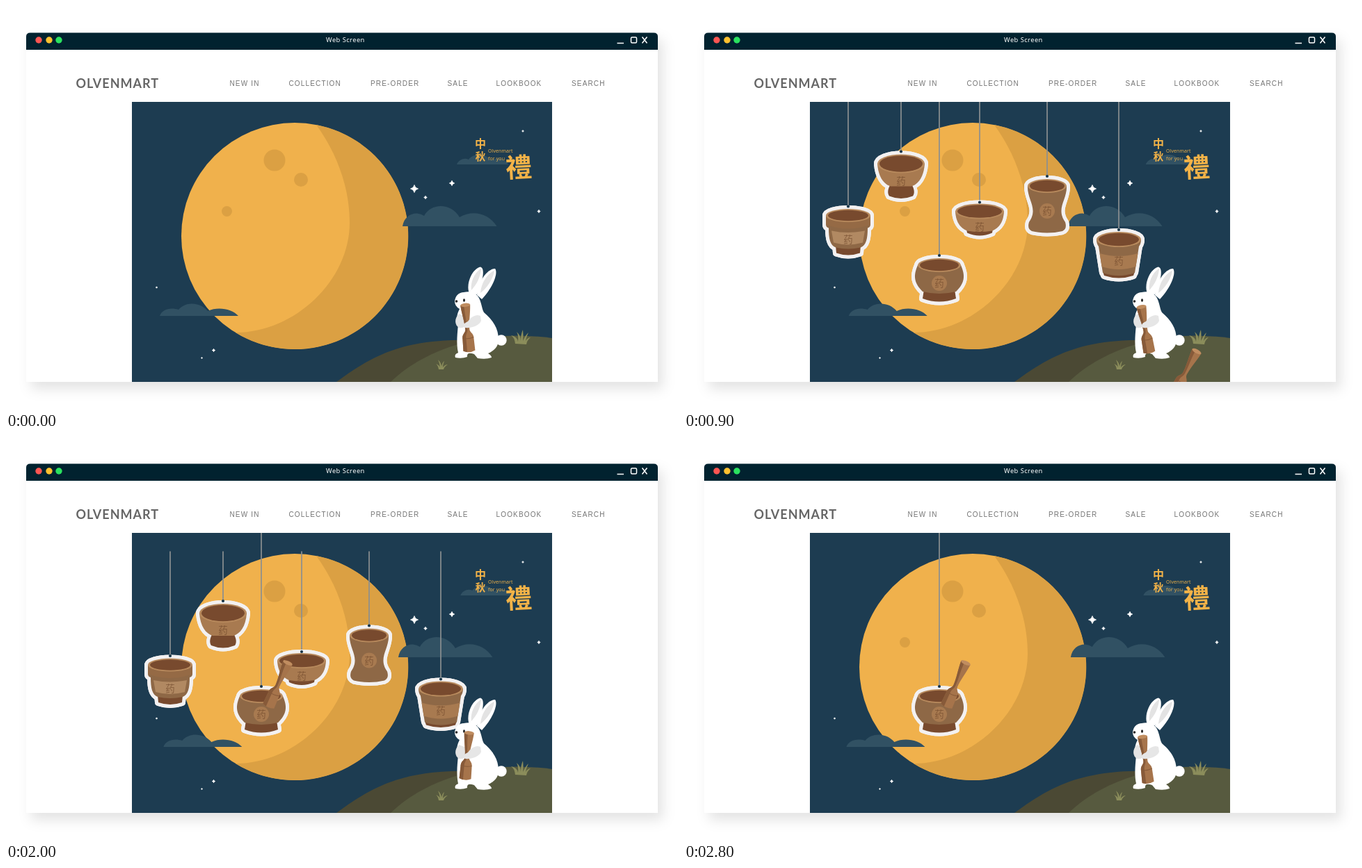
Write an HTML page that moves like this. It is 966 px wide and 580 px high and loops after 2900 ms.

```html
<!DOCTYPE html>
<html lang="en">
<head>
<meta charset="utf-8">
<title>Moon festival shop</title>
<style>
html, body { margin: 0; height: 100%; overflow: hidden; background: #fff; }
svg { display: block; }
.window { filter: drop-shadow(7px 10px 9px rgba(0, 0, 0, .11)); }
.title { font: 9.3px "Noto Sans", sans-serif; letter-spacing: .45px; fill: #fff; }
.logo { font: bold 18px Lato, sans-serif; letter-spacing: 1px; fill: #666; }
.nav { font: 10px "Liberation Sans", Arial, sans-serif; letter-spacing: 1.15px; fill: #747474; }
.gift { font: bold 16px "Noto Sans CJK TC", "Noto Sans CJK SC", sans-serif; fill: #f3b348; text-anchor: middle; }
.small { font: 7px "Open Sans", sans-serif; letter-spacing: .1px; fill: #f3b348; }
.mark { font: 300 13.5px "Noto Sans CJK SC", "Noto Sans CJK TC", sans-serif; fill: #70482b; opacity: .65; text-anchor: middle; }
.sticker * { fill: #f3f1f1; stroke: #f3f1f1; stroke-width: 10; stroke-linejoin: round; }
.string { stroke: #8b8f91; stroke-width: 1.7; }
.cloud { fill: #315163; }
.grass { fill: #8b8d5b; }
</style>
</head>
<body>
<svg width="966" height="580" viewBox="0 0 966 580">
  <defs>
    <clipPath id="art"><path d="M181 138H785V541H181Z"/></clipPath>
    <g id="pestle">
      <path fill="#a6744b" d="M-7 0C-6 14 -3 24 -3 35C-3 40 -8 41 -8 47L-8.5 66Q0 70 8.5 66L8 47C8 41 3 40 3 35C3 24 6 14 7 0Z"/>
      <path fill="#875a39" d="M-7 0C-6 14 -3 24 -3 35C-3 40 -8 41 -8 47L-8.5 66L-3 68L-3 47C-3 41 0 40 0 35C0 24 -2 14 -2 2Z"/>
      <path fill="none" stroke="#875a39" d="M-8 47Q0 50 8 47"/>
      <ellipse rx="7" ry="2.7" fill="#c08d60"/>
    </g>
  </defs>

  <g class="window">
    <path fill="#fff" d="M29 44Q29 38 35 38H931Q937 38 937 44V541H29Z"/>
  </g>
  <path fill="#01222f" d="M29 63V44Q29 38.500 35 38.500H931Q937 38.500 937 44V63Z"/>
  <circle cx="47" cy="49" r="4.7" fill="#fd5552"/>
  <circle cx="62" cy="49" r="4.7" fill="#fec12f"/>
  <circle cx="76" cy="49" r="4.7" fill="#2ae25f"/>
  <text class="title" x="460" y="52">Web Screen</text>
  <path fill="none" stroke="#fff" stroke-width="1.5" d="M878.500 53.500H888M914.500 44.500L921.500 53.500M921.500 44.500L914.500 53.500"/>
  <rect x="898.500" y="45" width="8" height="8" rx="1.5" fill="none" stroke="#fff" stroke-width="1.5"/>
  <text class="logo" x="100.500" y="118">OLVENMART</text>
  <g class="nav">
    <text x="321.500" y="115">NEW IN</text>
    <text x="406.500" y="115">COLLECTION</text>
    <text x="524" y="115">PRE-ORDER</text>
    <text x="634.500" y="115">SALE</text>
    <text x="704.500" y="115">LOOKBOOK</text>
    <text x="813" y="115">SEARCH</text>
  </g>

  <g clip-path="url(#art)">
    <path fill="#1d3c51" d="M181 138H785V541H181Z"/>
    <circle cx="415" cy="331" r="163" fill="#f0b14c"/>
    <g fill="#dba043">
      <path d="M446 171C478 215 494 265 494 312C494 395 415 470 330 470A163 163 0 1 0 446 171Z"/>
      <circle cx="386" cy="222" r="15.500"/>
      <circle cx="424" cy="250" r="10"/>
      <circle cx="317.500" cy="295.500" r="7.500"/>
    </g>
    <path id="stars" fill="#fff" stroke="#fff" stroke-width=".8"/>
    <path class="cloud" data-drift="-24" d="M570 317C572 304 582 298 591 298.500Q597 299 601 302C611 283 640 283 652 304C670 293 694 298 705.500 317Z"/>
    <path class="cloud" data-drift="21" d="M221 446C224 437 236 433 248 437C258 425 279 426 290 439C305 432 325 436 334 446Z"/>
    <path class="cloud" data-drift="21" d="M648 228C651 221 659 218 665 221C672 211 690 212 697 222C707 217 717 220 722 228Z"/>
    <text class="gift" x="682" y="204">中</text>
    <text class="gift" x="682" y="222" style="font-size:14.500px">秋</text>
    <text class="gift" x="737" y="246" style="font-size:38px" transform="rotate(-3 737 232)">禮</text>
    <text class="small" x="693" y="211">Olvenmart</text>
    <text class="small" x="693" y="222">for you</text>

    <path fill="#4b4934" d="M475 541C520 508 560 484 640 481L700 480V541Z"/>
    <path fill="#575a3f" d="M553 541C600 495 675 474 735 474.500Q765 475 785 478V541Z"/>
    <path class="grass" d="M732 486Q731 477 726 474Q735 476 736 483Q737 474 734 469Q740 474 740 482Q740 472 743 466Q744 474 743 482Q747 473 751 470Q748 476 747 482Q750 477 754 477Q749 481 748 487Z"/>
    <path class="grass" d="M622 523Q621 517 618 515Q623 517 624 520Q623 513 621 509Q626 514 626 519Q627 513 630 511Q628 516 628 520Q631 516 635 516Q630 519 629 523Z"/>

    <g id="pots"></g>
    <use id="thrown" href="#pestle"/>

    <g fill="#fff">
      <path d="M666 414C660 398 672 377 682 375.500C690 378 684 400 677 415Z"/>
      <path d="M677 416C678 397 692 378 703 378C708 384 700 405 684 422Z"/>
      <circle cx="712" cy="481" r="7.700"/>
      <path d="M645 425C646 417 651 412 658 412Q668 410 675 414C684 422 683 434 687 441C700 452 708 464 708 480C708 490 702 496 693 500Q698 503 698 506Q690 509 678 507L673 501Q662 497 663 505Q655 508 646 506Q644 501 650 499C647 485 649 470 650 458C646 448 650 440 652 436Q645 432 645 425Z"/>
    </g>
    <g fill="#e3e3e3">
      <path d="M669 409C667 396 675 382 683 378C682 390 677 400 669 409Z"/>
      <path d="M682 413C683 398 693 384 702 381C700 394 691 406 682 413Z"/>
      <path d="M651 443C644 450 645 459 651 463Q658 464 663 459L664 448Z"/>
    </g>
    <circle cx="647.500" cy="425" r="1.800" fill="#222"/>
    <ellipse cx="658.500" cy="423.500" rx="1.500" ry="2.200" fill="#222"/>
    <use id="held" href="#pestle"/>
    <path fill="#e6e6e6" d="M682 446C676 443 669 447 664 454C658 456 656 461 660 463C667 464 680 461 683 453Z"/>
  </g>
</svg>
<script>
const $ = id => document.getElementById(id);
const LOOP = 2900, STEP = 100;

// Linear interpolation through [time, value] pairs.
function track(t, ...keys) {
  const i = keys.findIndex(k => k[0] > t);
  if (i < 0) return keys[keys.length - 1][1];
  if (i === 0) return keys[0][1];
  const [t0, a] = keys[i - 1], [t1, b] = keys[i];
  return a + (b - a) * (t - t0) / (t1 - t0);
}
const smooth = p => p * p * (3 - 2 * p);
const clamp = p => Math.max(0, Math.min(1, p));

const star = ([x, y, r]) => {
  const k = r * .18;
  return `M${x} ${y - r}Q${x + k} ${y - k} ${x + r} ${y}Q${x + k} ${y + k} ${x} ${y + r}` +
    `Q${x - k} ${y + k} ${x - r} ${y}Q${x - k} ${y - k} ${x} ${y - r}Z`;
};
$('stars').setAttribute('d', [[587, 263, 5.5], [641, 255, 3.7], [603, 275.5, 2.3], [743, 180, 1.4],
  [766, 295.5, 2.2], [216.5, 405, 1.2], [298.5, 495.5, 2.2], [281.5, 506.5, 1.1]].map(star).join(''));

// Pot shapes hang from the origin; mouth is [y, rx, ry].
const BROWN = '#8e6846', LIGHT = '#a87a50', PALE = '#b18962', DARK = '#784a2e';
const shape = (d, fill) => `<path d="${d}" fill="${fill}"/>`;
const badge = y => `<circle cy="${y}" r="11" fill="${LIGHT}"/>`;
const pots = [
  { x: 236, y: 288.5, mouth: [13, 32, 9.5], label: 52, color: BROWN,
    body: 'M-32 13V26Q-32 30 -28 31C-28 46 -26 56 -18 59Q0 63 18 59C26 56 28 46 28 31Q32 30 32 26V13Z',
    base: 'M-18 56L-17 67Q0 73 17 67L18 56Z',
    detail: shape('M-32 13V26Q0 38 32 26V13Z', '#956a45') +
      shape('M-24 35Q0 40 24 35L21 52Q0 58 -21 52Z', PALE) },
  { x: 312, y: 209.5, mouth: [17.5, 34, 13.5], label: 47, color: LIGHT,
    body: 'M-34 17C-33 36 -25 47 -15 50H15C25 47 33 36 34 17Z',
    base: 'M-15 47C-19 53 -20 60 -17 64Q0 71 17 64C20 60 19 53 15 47Z', detail: '' },
  { x: 425, y: 282.5, mouth: [13, 35, 11], label: 40, color: LIGHT,
    body: 'M-35 13C-34 32 -25 38 -18 41Q0 44 18 41C25 38 34 32 35 13Z',
    base: 'M-19 38L-18 44Q0 52 18 44L19 38Z', detail: '' },
  { x: 522, y: 245, mouth: [14, 28, 10], label: 55, color: BROWN,
    body: 'M-28 14C-29 34 -12 46 -26 66Q-29 76 -22 79Q0 84 22 79Q29 76 26 66C12 46 29 34 28 14Z',
    base: '', detail: badge(50) },
  { x: 625, y: 322, mouth: [14, 32, 11], label: 50, color: BROWN,
    body: 'M-32 14Q-32 20 -29 24L-23 62Q0 70 23 62L29 24Q32 20 32 14Z',
    base: 'M-23 60L-21 66Q0 73 21 66L23 60Z',
    detail: shape('M-27.5 34Q0 42 27.5 34L24.5 53Q0 61 -24.500 53Z', LIGHT) },
  { x: 367, y: 359, mouth: [14, 31, 10], label: 45, color: BROWN,
    body: 'M-31 14C-38 30 -36 40 -24 52Q0 58 24 52C36 40 38 30 31 14Z',
    base: 'M-22 49L-24 62Q0 71 24 62L22 49Z', detail: badge(40) },
];

function drawPot({ mouth: [y, rx, ry], body, base, detail, label, color, ...at }) {
  const oval = (inset, fill) =>
    `<ellipse cy="${y}" rx="${rx - inset}" ry="${ry - inset * .6}" fill="${fill}"/>`;
  const sticker = `<g class="sticker">${shape(base, '') + shape(body, '') + oval(0, '')}</g>`;
  return `<g><g transform="translate(${at.x} ${at.y})">${sticker}
    <path class="string" d="M0 0V${138 - at.y}"/>
    <g class="vessel">${sticker}${shape(base, DARK)}${shape(body, color)}${detail}
      ${oval(0, '#b88a5d')}${oval(3, DARK)}
      <text class="mark" y="${label}">药</text></g>
    <circle r="2.100" fill="#183548"/></g></g>`;
}
$('pots').innerHTML = pots.map(drawPot).join('');
const potNodes = [...$('pots').children];
const bowl = potNodes[5].querySelector('.vessel');
const clouds = document.querySelectorAll('.cloud');
const place = (node, value) => node.setAttribute('transform', value);

function render(t) {
  const drift = track(t, [0, 0], [1200, 1], [2270, 0], [2900, .7]);
  clouds.forEach(c => place(c, `translate(${c.dataset.drift * drift} 0)`));

  // Pots drop in, dip, then all but the bowl are pulled up.
  const drop = 300 * (smooth(clamp(t / 850)) - 1);
  const leave = track(t, [1800, 0], [1900, 16], [2000, 26.5], [2100, -1], [2200, -53],
    [2300, -119], [2400, -198], [2500, -320]);
  potNodes.forEach((p, i) => place(p, `translate(0 ${drop + (i < 5 ? leave : 0)})`));

  // The bowl tilts and swells as the pestle lands.
  const hit = track(t, [1400, 0], [1600, 1], [1800, 0]);
  place(bowl, `translate(-14 -14) rotate(${-12 * hit}) scale(${1 + .2 * hit}) translate(14 14)`);

  const flight = clamp((t - 1000) / 400);
  const x = 737 - 332 * flight;
  const rise = track(t, [300, 75], [600, 0]);
  const y = 497 - 172 * flight - 240 * flight * (1 - flight) + rise;
  place($('thrown'), `translate(${x} ${y}) rotate(${28 - 4 * flight}) scale(1.03)`);

  const tilt = track(t, [0, -5], [600, -6], [900, -10], [1500, 5], [2000, 5], [2200, -3], [2800, -7]);
  place($('held'), `translate(663 ${428 - tilt * .45}) rotate(${tilt} 0 32)`);
}

function tick(now) {
  render(Math.floor(now % LOOP / STEP) * STEP);
  requestAnimationFrame(tick);
}
tick(performance.now());
</script>
</body>
</html>
```
